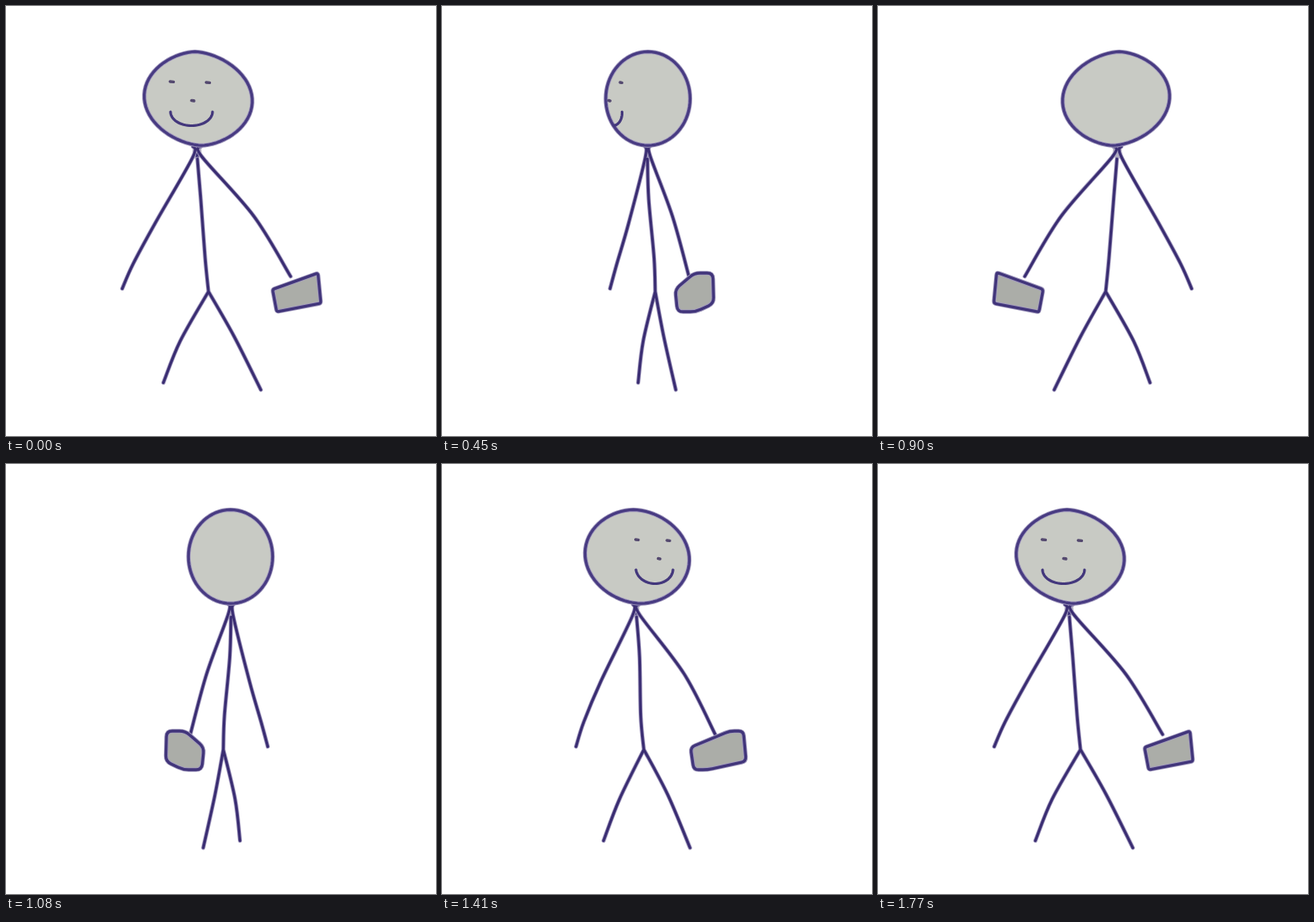
An HTML page for the animation above (1800 ms loop, 512x512 px).

```html
<!DOCTYPE html>
<html lang="en">
<head>
<meta charset="utf-8">
<title>Turning stick figure</title>
<style>
html, body { margin: 0; width: 100%; height: 100%; overflow: hidden; background: #fff; }
svg { display: block; width: 100vw; height: 100vh; }
path { fill: none; stroke-linecap: round; stroke-linejoin: round; }
</style>
</head>
<body>
<svg id="stage" viewBox="0 0 512 512">
  <clipPath id="headClip"><path id="headShape"/></clipPath>
</svg>
<script>
const AXIS = 256.4, STEP = 30, STEPS = 60, LOOP = STEP * STEPS;
const { sin, cos, PI, abs, sign, sqrt, min, max, floor, hypot } = Math;
const stage = document.getElementById("stage");
const headShape = document.getElementById("headShape");

// Points are [x, y, z]; x and z are measured from the turning axis.
const NECK_LEFT = [-34, 167, 4], NECK_RIGHT = [-24, 167, 4.5], CHEST = [-28.5, 182, 4];
const HIP = [-15.3, 340, 6.6];
const LIMBS = [
  [NECK_LEFT, [-34.5, 181, 4.5], [-79, 259, 9], [-105, 307, 8.8], [-118, 336.5, 7.4]],
  [NECK_RIGHT, [-23.5, 179, 4.8], [38.5, 250, -3], [82.5, 322, -7.2]],
  [CHEST, [-24.5, 230, 3.2], [-19.3, 300, 7.5], HIP],
  [HIP, [-49, 399, 10.8], [-69, 448.5, 16.2]],
  [HIP, [15.5, 394, -.6], [47, 457, -3.5]]
];

const HEAD = { x: -27.5, y: 110.3, z: 4, height: 55.8, width: 64.2, depth: 48.9, skew: -398 };
const BOX = { thickness: 13, corners: [[61, 337.5, 0], [115, 318, -7], [118.5, 354, -8], [66, 364, 0]] };

const EYES = [[-59, 90, -35], [-16, 91, -41]];
const NOSE = [-34, 112.5, -46];
const MOUTH = Array.from({ length: 33 }, (_, i) => {
  const t = i / 32;
  return [-35.5 - 25 * cos(PI * t), 126 + 16.5 * sin(PI * t), -35 - 8 * t - sin(PI * t)];
});

function addPath(stroke, width, fill = "none") {
  const path = document.createElementNS("http://www.w3.org/2000/svg", "path");
  path.setAttribute("stroke", stroke);
  path.setAttribute("stroke-width", width);
  path.style.fill = fill;
  stage.append(path);
  return d => path.setAttribute("d", d);
}

// An ink line is a soft wide stroke below a dark narrow one.
function addInk(width, core, fill) {
  const layers = [addPath("#a098bd", width + .9, fill), addPath(core, width - .9)];
  return d => layers.forEach(set => set(d));
}

function addFeature(color, width) {
  const set = addPath(color, width);
  stage.lastChild.setAttribute("clip-path", "url(#headClip)");
  return set;
}

const place = ([x, y, z], a) => [AXIS + x * cos(a) + z * sin(a), y];
const facesViewer = ([x, , z], a) => (z - HEAD.z) * cos(a) - (x - HEAD.x) * sin(a) < 0;
const fmt = p => p.map(v => v.toFixed(2)).join(" ");
const polyline = pts => "M" + pts.map(fmt).join("L");

function smooth(pts) {
  const at = i => pts[min(pts.length - 1, max(0, i))];
  let d = "M" + fmt(pts[0]);
  for (let i = 0; i < pts.length - 1; i++) {
    const [p, q, r, s] = [at(i - 1), at(i), at(i + 1), at(i + 2)];
    const c1 = q.map((v, k) => v + (r[k] - p[k]) / 6);
    const c2 = r.map((v, k) => v - (s[k] - q[k]) / 6);
    d += `C${fmt(c1)} ${fmt(c2)} ${fmt(r)}`;
  }
  return d;
}

// A leaning ellipsoid, slightly pointed when seen from front or back.
function headOutline(a) {
  const c = cos(a), s = sin(a);
  const half = sqrt((HEAD.width * c) ** 2 + (HEAD.depth * s) ** 2 + 2 * HEAD.skew * c * s);
  const power = .93 + .25 * c * c;
  const lean = .07 * c - .044 * s;
  const [mid] = place([HEAD.x, 0, HEAD.z], a);
  const pts = Array.from({ length: 72 }, (_, i) => {
    const t = i / 72 * 2 * PI, across = sin(t), down = -cos(t) * HEAD.height;
    return [mid + lean * down + half * sign(across) * abs(across) ** power, HEAD.y + down];
  });
  return polyline(pts) + "Z";
}

function convexHull(pts) {
  const chain = list => list.reduce((hull, p) => {
    const turnsWrong = () => {
      const [o, q] = hull.slice(-2);
      return (q[0] - o[0]) * (p[1] - o[1]) - (q[1] - o[1]) * (p[0] - o[0]) <= 0;
    };
    while (hull.length > 1 && turnsWrong()) hull.pop();
    return [...hull, p];
  }, []).slice(0, -1);
  const sorted = [...pts].sort((p, q) => p[0] - q[0] || p[1] - q[1]);
  return [...chain(sorted), ...chain([...sorted].reverse())];
}

function rounded(pts, radius) {
  const toward = (p, q) => {
    const k = min(.5, radius / hypot(q[0] - p[0], q[1] - p[1]));
    return p.map((v, i) => v + (q[i] - v) * k);
  };
  const n = pts.length;
  return pts.map((p, i) =>
    `${i ? "L" : "M"}${fmt(toward(p, pts[(i + n - 1) % n]))}Q${fmt(p)} ${fmt(toward(p, pts[(i + 1) % n]))}`
  ).join("") + "Z";
}

function boxOutline(a) {
  const spread = BOX.thickness * abs(sin(a));
  const pts = BOX.corners.flatMap(corner => {
    const [x, y] = place(corner, a);
    return [[x - spread, y], [x + spread, y]];
  });
  return rounded(convexHull(pts), 2.5 + 5 * abs(sin(a)));
}

const setNeck = addPath("none", 0, "#b3b0c0");
const setThroat = addPath("#40347a", 3.6);
const throat = stage.lastChild;
const setLimbs = addInk(4, "#3a2d72");
const setHead = addInk(4.2, "#483b82", "#c8cac4");
const setBox = addInk(4.2, "#41357a", "#abada8");
const setMouth = addFeature("#43377c", 3.2);
const setEyes = EYES.map(() => addFeature("#54496f", 3.4));
const setNose = addFeature("#54496f", 3.6);

function dash(set, [x, y, z], half, a) {
  const ends = [[x - half, y, z], [x + half, y + .4, z]];
  set(facesViewer([x, y, z], a) ? polyline(ends.map(p => place(p, a))) : "");
}

function draw(time) {
  const u = floor(time % LOOP / STEP) / (STEPS - 1);
  const a = 2 * PI * u * u * (3 - 2 * u);
  const project = p => place(p, a);

  setNeck(polyline([NECK_LEFT, LIMBS[0][1], CHEST, LIMBS[1][1], NECK_RIGHT].map(project)) + "Z");
  setThroat(polyline([[-30.5, 166, 4], CHEST].map(project)));
  throat.style.opacity = max(0, cos(a));
  setLimbs(LIMBS.map(limb => smooth(limb.map(project))).join(""));

  const head = headOutline(a);
  setHead(head);
  headShape.setAttribute("d", head);
  setBox(boxOutline(a));

  const smile = MOUTH.filter(p => facesViewer(p, a)).map(project);
  setMouth(smile.length ? polyline(smile) : "");
  EYES.forEach((eye, i) => dash(setEyes[i], eye, 2.1, a));
  dash(setNose, NOSE, 1.4, a);
}

const start = performance.now();
function tick(now) {
  draw(max(0, now - start));
  requestAnimationFrame(tick);
}
draw(0);
requestAnimationFrame(tick);
</script>
</body>
</html>
```
